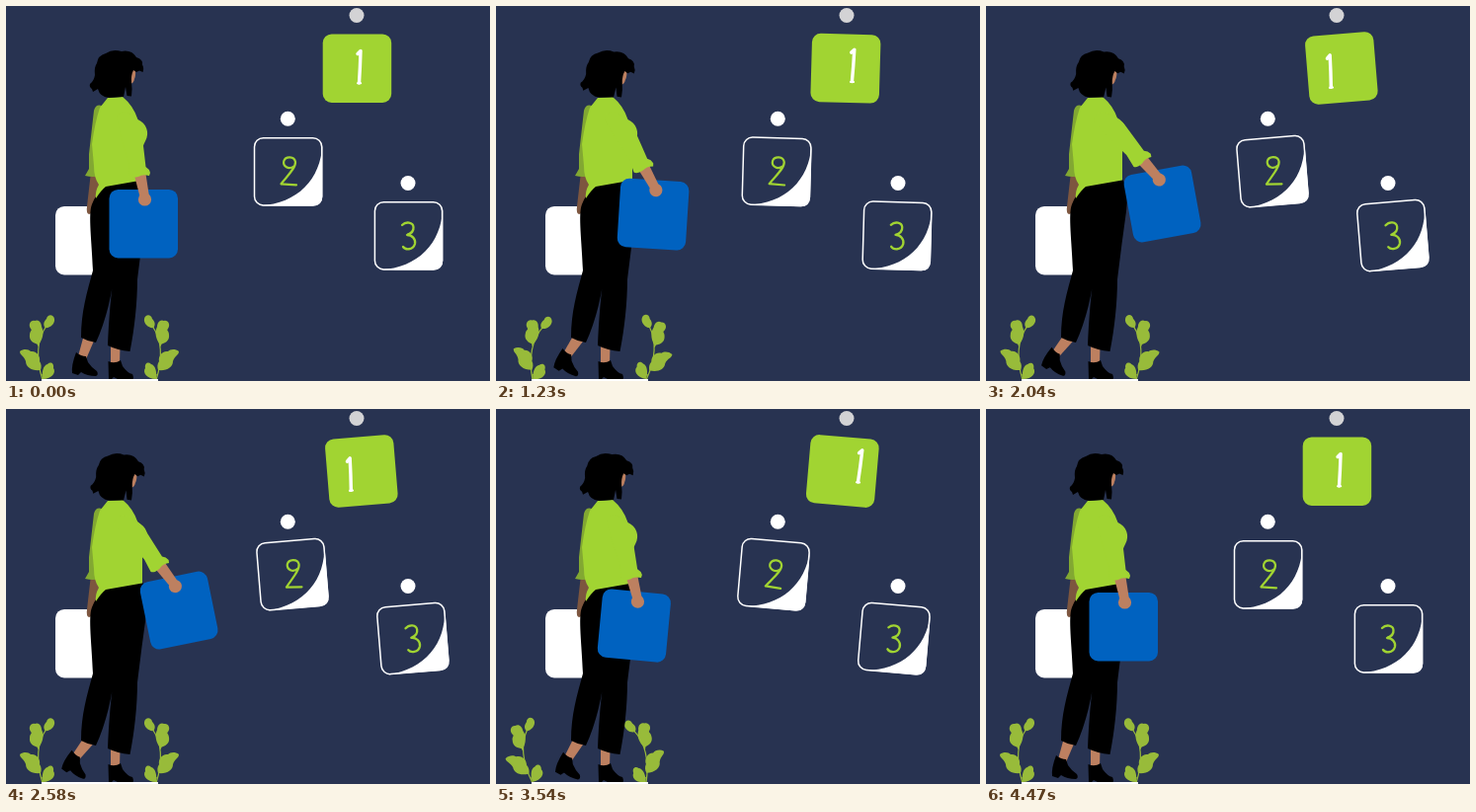
Write an HTML page with a canvas that moves like this. It is 490 by 380 pixels and loops after 4.53 s.

```html
<!DOCTYPE html>
<html lang="en">
<head>
<meta charset="utf-8">
<style>
html, body { margin: 0; width: 100%; height: 100%; overflow: hidden; background: #283351; }
canvas { display: block; }
</style>
</head>
<body>
<canvas id="stage" width="490" height="380"></canvas>
<script>
const ctx = document.getElementById('stage').getContext('2d');
const LOOP = 4530, STEP = 30, LAST = 149;
const NAVY = '#283351', LIME = '#a1d432', SHADE = '#82a832', LEAF = '#98bb3a';
const SKIN = '#bd8060', DARK_SKIN = '#7d563f', BLUE = '#0062c0';

// Keys are [step, value] pairs, eased in and out between neighbours.
const tracks = {
  tag: [[0, 0], [28, 5.2], [60, -4.7], [90, -4.7], [120, 5.1], [150, 0]],
  arm: [[0, 0], [76, -30.5], [114, -2.3], [150, 0]],
  bag: [[0, 0], [30, 6], [80, -13.2], [113, 5.7], [150, 0]],
  head: [[0, 0], [25, 3], [95, 3], [125, 0], [150, 0]],
  plant: [[0, 0], [28, 10.5], [60, 1.2], [90, 0], [120, -9.5], [150, 0]]
};

function valueAt(keys, step) {
  const i = Math.max(1, keys.findIndex(key => key[0] >= step));
  const [t0, a] = keys[i - 1], [t1, b] = keys[i];
  const s = (step - t0) / (t1 - t0);
  return a + (b - a) * s * s * (3 - 2 * s);
}

function turned(x, y, degrees, draw) {
  ctx.save();
  ctx.translate(x, y);
  ctx.rotate(degrees * Math.PI / 180);
  ctx.translate(-x, -y);
  draw();
  ctx.restore();
}

function fill(color, path) {
  ctx.fillStyle = color;
  ctx.fill(new Path2D(path));
}

function stroke(color, width, path) {
  ctx.strokeStyle = color;
  ctx.lineWidth = width;
  ctx.lineCap = ctx.lineJoin = 'round';
  ctx.stroke(new Path2D(path));
}

function disc(color, x, y, r) {
  ctx.fillStyle = color;
  ctx.beginPath();
  ctx.arc(x, y, r, 0, Math.PI * 2);
  ctx.fill();
}

function card(x, y, color) {
  ctx.beginPath();
  ctx.roundRect(x, y, 69.5, 69.5, 9);
  ctx.fillStyle = color;
  ctx.fill();
}

function outlineCard(x, y) {
  ctx.beginPath();
  ctx.roundRect(x + .7, y + .7, 68.2, 68.2, 9);
  ctx.strokeStyle = '#fff';
  ctx.lineWidth = 1.5;
  ctx.stroke();
  ctx.save();
  ctx.translate(x, y);
  fill('#fff', 'M69.5 7C68 43 44 67 7 69.3L60 69.5Q69.5 69.5 69.5 60Z');
  ctx.restore();
}

function tags(angle) {
  disc('#d3d3d5', 355, 9.5, 7.5);
  disc('#fff', 285.3, 114.3, 7.5);
  disc('#fff', 407, 179.5, 7.5);
  turned(355, 9.5, angle, () => card(320.7, 28.4, LIME));
  turned(285.3, 114.3, angle, () => {
    outlineCard(250.8, 133);
    stroke(LIME, 2.2, 'M292 162C286 167 280 162 281.3 157C283 152 292 152 293 158C293.5 164 285 172 278.5 180.3L294 181.3');
  });
  turned(407, 179.5, angle, () => {
    outlineCard(372.7, 198);
    stroke(LIME, 2.3, 'M401 222C405 218 412 219 412.5 224C413 229 409 231 406 232C411 232 415 236 414 241C412 248 404 247 402 244');
    // The first numeral swings from the lowest pin.
    stroke('#fff', 3.4, 'M356 48.5L359 45.5L358.4 62L357.5 78');
    stroke('#fff', 2, 'M356 78.3L359.2 78.3');
  });
}

function plant() {
  stroke(LEAF, 1.2, 'M37 379C31 360 30 340 41 324M33 357L29 365M33 345L31 339M36 374L40 373');
  fill(LEAF, 'M39.5 326C37 322 39 319 41 317C42 312 48 312 49 317C50 322 44 327 39.5 326Z');
  fill(LEAF, 'M33 343C28 342 23 339 24 333C24 329 27 329 25 327C22 323 25 318 29 319C33 317 36 321 36 325C39 331 37 338 33 343Z');
  fill(LEAF, 'M35 369C26 370 20 366 20 360C18 354 14 354 14 350C18 347 23 348 25 350C31 349 35 355 34 360C36 363 36 366 35 369Z');
  fill(LEAF, 'M37 378C36 370 38 364 42 363C45 360 49 362 48 367C51 371 47 378 37 378Z');
}

function plants(angle) {
  turned(37, 379, angle, plant);
  turned(152, 379, angle, () => {
    ctx.translate(189, 0);
    ctx.scale(-1, 1);
    plant();
  });
}

function backLeg(angle) {
  turned(85, 335, angle, () => {
    fill(SKIN, 'M79 333L90 337L81 358L73 355Z');
    fill('#000', 'M71 351Q76 355 81 355L83 361Q87 367 92 370Q94 374 91 375Q82 375 76 371L73 374L67 372Q66 364 71 351Z');
  });
}

function legs(swing) {
  backLeg(swing);
  fill(SKIN, 'M106 342L115.5 344L115 364L106 364Z');
  fill('#000', 'M103.5 360Q110 363 116 359L118 365Q123 372 128 373Q130 378 128 378L113 378L109 376L107 378L104 378Z');
  fill('#000', 'M101 182L137 175C143 180 144 190 142 208L137.5 241L133 277C133 300 130 328 125.5 350Q113 349 103 344C104 320 106 290 110.5 264C108 290 101 320 91 341Q83 340 76 336C76 310 82 290 88 268C87 240 83 210 87 201Q91 190 101 182Z');
}

function head(angle) {
  turned(110, 92, angle, () => {
    fill(SKIN, 'M126 64L131 64Q131.5 71 130 74Q129.5 78 126 79Z');
    fill('#000', 'M104 93L119 92L121 82L122.5 91L127 91.5Q128 83 127 77Q126.5 70 129 65L132 67L135 65.5L138.5 67Q140 63 138 59.5Q139 54 132 52Q127 44 117 46Q108 43 101 48Q93 50 92 58Q89 62 90 70Q89 76 85 79Q84 82 87 84L88 87L93 84Q95 92 104 93Z');
  });
}

function frontArm(armAngle, bagAngle) {
  turned(120, 120, armAngle, () => {
    turned(140.5, 196, bagAngle - armAngle, () => card(104.5, 185.9, BLUE));
    fill(SKIN, 'M129 168L141 167L145 193L136 195Z');
    disc(SKIN, 140.5, 196, 6.6);
    fill(LIME, 'M112 112Q120 101 130 114Q137 122 138 133L140 150L141.5 163Q145 165 146 169L145 172Q138 170 134 173Q127 175 124.5 172L124 158L116 130Z');
  });
}

function woman(step) {
  card(50, 202.9, '#fff');
  fill(DARK_SKIN, 'M86 168L95 168L93 198Q90 211 84 211Q81 210 82 203Z');
  legs(19 * Math.sin(Math.PI * step / LAST));
  fill(SHADE, 'M97 101Q91 99 89 106L84 150L84 165L80 172Q88 174 96 172L99 120Z');
  fill(LIME, 'M103 93L118 92Q129 101 133.5 115C142 119 146 128 141 137Q138 142 138 150L138 176.5L101 183Q96 187 91 195Q90 188 94 181Q89 174 89 162L87 140Q90 118 95 103Z');
  head(valueAt(tracks.head, step));
  frontArm(valueAt(tracks.arm, step), valueAt(tracks.bag, step));
}

function render(now) {
  const step = Math.min(LAST, Math.floor(now % LOOP / STEP));
  ctx.fillStyle = NAVY;
  ctx.fillRect(0, 0, 490, 380);
  tags(valueAt(tracks.tag, step));
  plants(valueAt(tracks.plant, step));
  woman(step);
  ctx.fillStyle = '#fff';
  ctx.fillRect(36, 378, 118, 2);
}

const start = performance.now();
function tick() {
  render(performance.now() - start);
  requestAnimationFrame(tick);
}
tick();
</script>
</body>
</html>
```
